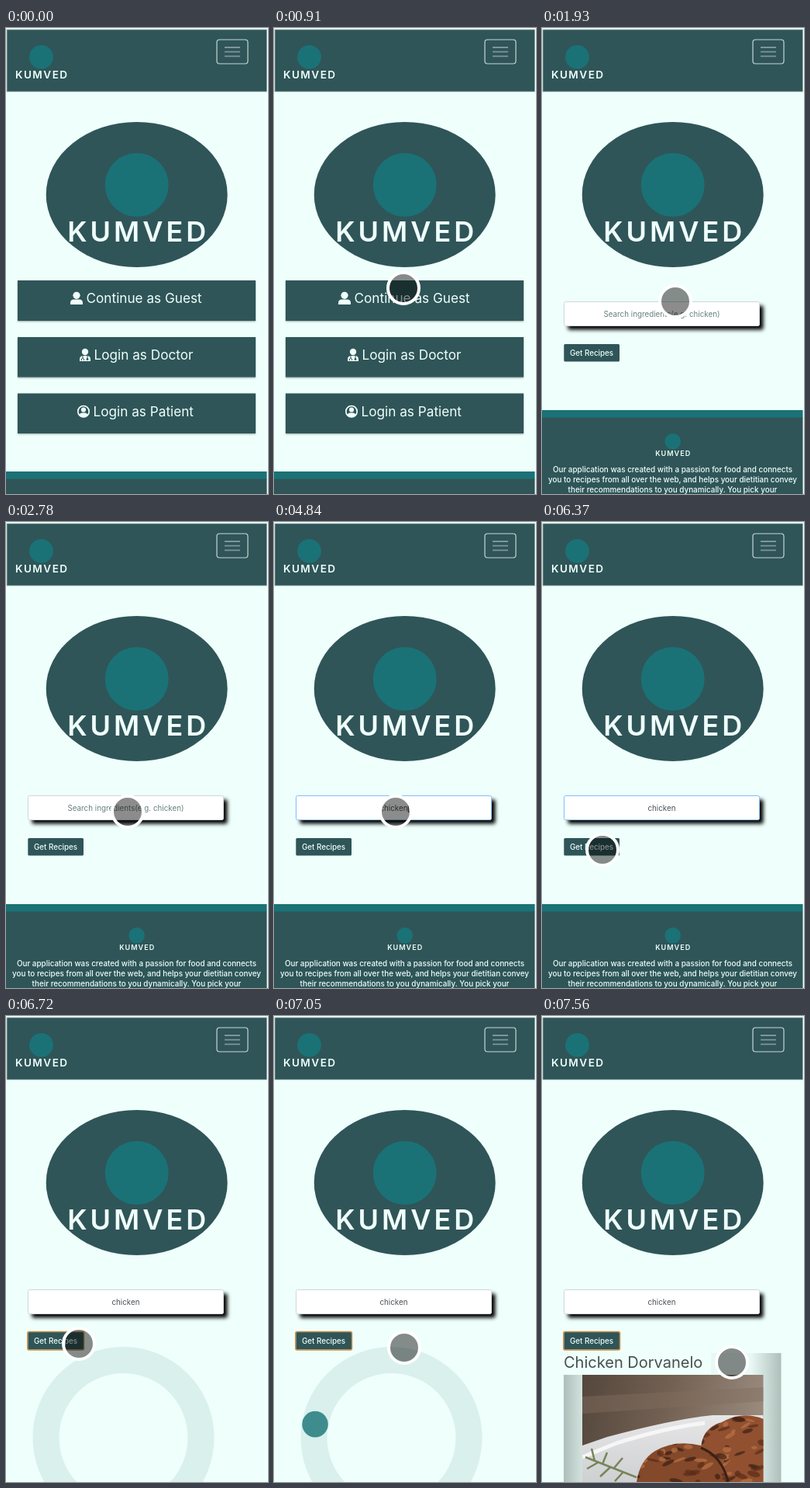
An HTML page that plays this animation: 338 px wide and 600 px high, repeating every 8000 ms.

```html
<!DOCTYPE html>
<html lang="en">
<head>
<meta charset="utf-8">
<title>Recipe search</title>
<style>
  html, body { margin: 0; width: 100%; height: 100%; overflow: hidden; background: #effffb; }
  svg { display: block; width: 338px; height: 600px; font-family: Inter, "Open Sans", sans-serif; }
  .dark { fill: #2f5558; }
  .teal { fill: #1a7276; }
  .mint { fill: #effffb; }
  .menu { font-size: 17.2px; }
  .small { font-size: 9.8px; }
  .mid { text-anchor: middle; }
  .lift { filter: drop-shadow(0 1px 1px rgba(0, 0, 0, .35)); }
  #field { filter: drop-shadow(5px 5px 2.5px #000); }
</style>
</head>
<body>
<svg viewBox="0 0 338 600">
  <defs>
    <g id="brand">
      <circle class="teal" cy="41" r="41"/>
      <text class="mint mid" x="2" y="114" font-size="36" font-weight="600" letter-spacing="4">KUMVED</text>
    </g>
    <linearGradient id="card">
      <stop offset="0" stop-color="#aebfba"/>
      <stop offset=".14" stop-color="#e9f8f4"/>
      <stop offset=".86" stop-color="#e9f8f4"/>
      <stop offset="1" stop-color="#aebfba"/>
    </linearGradient>
    <linearGradient id="wall" x2="1" y2=".15">
      <stop offset="0" stop-color="#54463c"/>
      <stop offset=".5" stop-color="#736153"/>
      <stop offset="1" stop-color="#98897c"/>
    </linearGradient>
    <linearGradient id="plate" x2="0" y2="1">
      <stop offset="0" stop-color="#e6e6e7"/>
      <stop offset="1" stop-color="#cfd0d2"/>
    </linearGradient>
    <path id="left" d="M122 600Q126 572 146 560Q172 545 205 553Q232 563 240 600z"/>
    <path id="right" d="M205 556Q207 530 232 523Q258 508 286 519V600H235Q232 566 205 556z"/>
    <clipPath id="frame"><rect x="52" y="462" width="233.5" height="138"/></clipPath>
    <clipPath id="meat"><use href="#left"/><use href="#right"/></clipPath>
  </defs>

  <rect class="mint" width="338" height="600"/>

  <rect x="1" y="2" width="335.5" height="80" fill="#2f5558" stroke="#a9bcba" stroke-width=".8"/>
  <use href="#brand" transform="translate(45.5 22) scale(.376)"/>
  <rect x="272" y="15" width="40" height="31" rx="3.5" fill="none" stroke="#c9d6d5" stroke-width="1.2"/>
  <path d="M282 25h20M282 30.7h20M282 36.4h20" stroke="#7f9698" stroke-width="1.8"/>
  <ellipse class="dark" cx="168.7" cy="214.5" rx="117" ry="93.5"/>
  <use href="#brand" transform="translate(168.7 161)"/>

  <g id="home">
    <g class="dark lift">
      <rect x="15" y="325" width="307" height="52"/>
      <rect x="15" y="398" width="307" height="51.5"/>
      <rect x="15" y="470.5" width="307" height="51.5"/>
    </g>
    <g class="mint menu">
      <circle cx="91" cy="344.3" r="4.6"/>
      <path d="M83 356v-2q0-4.5 4.5-4.5h7q4.5 0 4.5 4.5v2z"/>
      <text x="103.5" y="354">Continue as Guest</text>

      <circle cx="102" cy="417" r="4.2"/>
      <path d="M95 429v-2.5q0-4 4-4.5h6q4 .5 4 4.5v2.5z"/>
      <path d="M99 422v3m-1.5 3v-2q1.5-2 3 0v2M105 422v4" fill="none" stroke="#2f5558"/>
      <circle class="dark" cx="105" cy="426.5" r="1.4"/>
      <text x="113.5" y="427">Login as Doctor</text>

      <circle cx="100" cy="493.7" r="7.2" fill="none" stroke="#effffb" stroke-width="1.7"/>
      <circle cx="100" cy="491.5" r="3.1"/>
      <path d="M94.5 498.5q1-3 3.5-3h4q2.5 0 3.5 3q-5.5 4.5-11 0z"/>
      <text x="112.5" y="500">Login as Patient</text>
    </g>
    <rect id="hover" class="mint" x="99" y="355.5" width="155" height="1"/>
    <rect class="teal" y="571" width="336.5" height="10"/>
    <rect class="dark" y="580.5" width="336.5" height="20"/>
  </g>

  <g id="search">
    <g id="field"><rect x="28.5" y="352.5" width="252" height="31" rx="2" fill="#fff"/></g>
    <rect id="edge" x="28.5" y="352.5" width="252" height="31" rx="2" fill="#fff"/>
    <text id="hint" class="small mid" x="154.5" y="371.5" fill="#65807f">Search ingredients(e.g. chicken)</text>
    <text id="typed" class="small mid" x="154.5" y="371.5" fill="#495057"></text>
    <rect id="caret" x="172.8" y="362" width="1" height="12" fill="#222"/>
    <rect class="dark" x="28.3" y="407" width="71.7" height="22.5" rx="1.5"/>
    <rect id="focus" x="27.8" y="406.5" width="72.7" height="23.5" rx="2" fill="none" stroke="#c98f45" stroke-width="1.5"/>
    <text class="small mid mint" x="64" y="422" font-weight="500">Get Recipes</text>
  </g>

  <g id="footer">
    <rect class="teal" y="492" width="336.5" height="10"/>
    <rect class="dark" y="501.5" width="336.5" height="99"/>
    <use href="#brand" transform="translate(168.7 522) scale(.252)"/>
    <g class="mint mid" font-size="9.9" font-weight="500">
      <text x="168.5" y="571.5">Our application was created with a passion for food and connects</text>
      <text x="168.5" y="584.7">you to recipes from all over the web, and helps your dietitian convey</text>
      <text x="168.5" y="598">their recommendations to you dynamically. You pick your</text>
    </g>
  </g>

  <g id="loader">
    <circle cx="151.5" cy="543" r="100" fill="none" stroke="#daf0ec" stroke-width="34"/>
    <circle id="ball" r="16.8" fill="#3f8c8e"/>
  </g>

  <g id="recipe">
    <rect x="28" y="434" width="280.5" height="166" fill="url(#card)"/>
    <rect class="mint" x="28" y="434" width="190" height="28"/>
    <text x="28" y="452.5" font-size="20" fill="#46504f">Chicken Dorvanelo</text>
    <g clip-path="url(#frame)">
      <rect x="52" y="462" width="234" height="138" fill="url(#wall)"/>
      <path d="M52 490L286 478V496L52 512z" fill="#806d5e" opacity=".45"/>
      <path d="M52 553L84 542Q170 519 220 514H286V600H52z" fill="url(#plate)"/>
      <path d="M52 568L96 550Q160 530 210 524" fill="none" stroke="#f6f6f6" stroke-width="5"/>
      <path d="M56 568L122 594M68 573L64 557M78 577L84 562M92 583L104 569M72 575L58 583M88 581L75 593M104 588L94 599"
            fill="none" stroke="#76855a" stroke-width="2.5"/>
      <use href="#left" fill="#84482a"/>
      <use href="#right" fill="#915030"/>
      <g id="char" clip-path="url(#meat)"></g>
      <path d="M205 556Q232 566 240 600" fill="none" stroke="#3b2015" stroke-width="3"/>
    </g>
  </g>

  <circle id="touch" r="20" fill="rgba(0,0,0,.45)" stroke="#fff" stroke-width="4"/>
</svg>
<script>
  const LOOP = 8000;
  const $ = id => document.getElementById(id);
  const show = (id, on) => $(id).setAttribute("display", on ? "inline" : "none");

  // [time, x, y]: the touch ring holds each place until the next
  const path = [
    [390, 182, 452], [550, 166, 406], [730, 152, 358], [910, 167, 335],
    [1070, 171, 345], [1230, 172, 352],
    [2440, 168, 357], [2610, 161, 367], [2780, 157, 373],
    [5340, 195, 376], [5510, 254, 388], [5680, 285, 412], [5860, 250, 443],
    [6030, 184, 452], [6200, 116, 436], [6370, 78, 422],
    [6720, 94, 422], [6880, 132, 424], [7050, 168, 427],
    [7220, 200, 433], [7390, 228, 441], [7560, 245, 446]
  ];
  const typing = [[4310, "ch"], [4480, "chic"], [4660, "chicke"], [4840, "chicken"]];
  const ticks = [6550, 6720, 6880, 7050, 7220, 7390];

  // mottled crust from a seeded generator
  let seed = 7;
  const random = () => (seed = seed * 16807 % 2147483647) / 2147483647;
  const crust = ["#3b2015", "#5a2d18", "#b87243"];
  let spots = "";
  for (let i = 0; i < 75; i++) {
    const x = 122 + 164 * random(), y = 510 + 90 * random();
    const rx = 3 + 6 * random(), ry = 1.5 + 2.5 * random();
    spots += `<ellipse rx="${rx}" ry="${ry}" fill="${crust[i % 3]}" opacity=".7"
      transform="translate(${x} ${y}) rotate(${60 * random() - 40})"/>`;
  }
  $("char").innerHTML = spots;

  const last = (list, t, time = row => row[0]) => list.filter(row => time(row) <= t).pop();

  function draw(t) {
    const within = (a, b) => t >= a && t < b;
    show("home", t < 1930);
    show("hover", within(1580, 1930));
    show("search", t >= 1930);
    show("footer", within(1930, 6720));
    show("loader", within(6720, 7560));
    show("recipe", t >= 7560);

    show("hint", t < 4310);
    show("caret", within(4840, 5340));
    show("focus", t >= 6550);
    $("edge").setAttribute("stroke", within(3990, 6550) ? "#80bdff" : "#ced8dc");
    const word = last(typing, t);
    $("typed").textContent = word ? word[1] : "";

    const tick = last(ticks, t, n => n) || 0;
    const turn = (190 + (tick - 7050) * 0.36) * Math.PI / 180;
    $("ball").setAttribute("cx", 151.5 + 100 * Math.cos(turn));
    $("ball").setAttribute("cy", 543 + 100 * Math.sin(turn));

    const spot = last(path, t);
    show("touch", spot);
    if (spot) $("touch").setAttribute("transform", `translate(${spot[1]} ${spot[2]})`);
  }

  const start = performance.now();
  function loop() {
    draw((performance.now() - start) % LOOP);
    requestAnimationFrame(loop);
  }
  loop();
</script>
</body>
</html>
```
